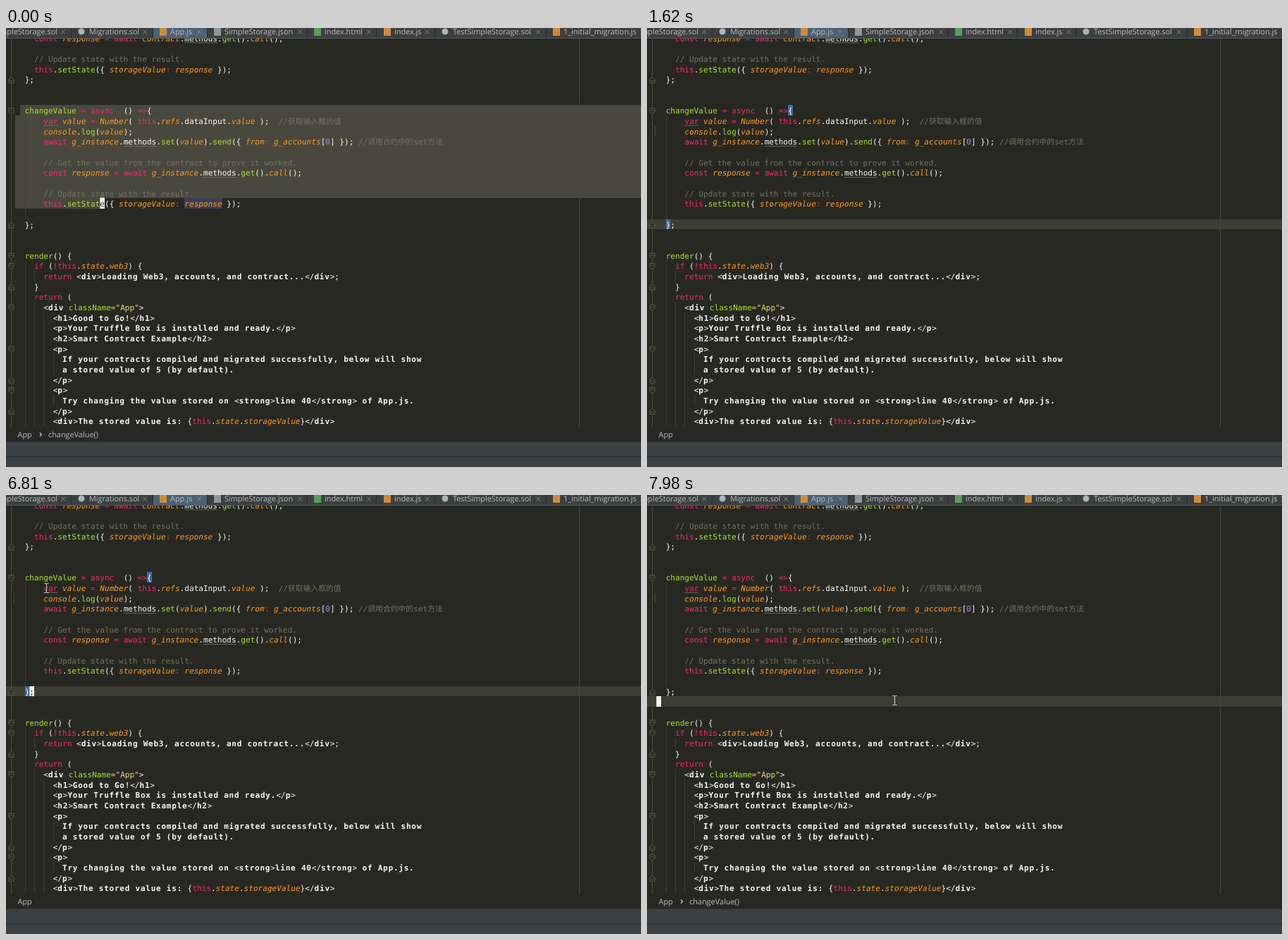
These frames come from a looping animation (901x622 px, 8 s). An HTML page:

```html
<!DOCTYPE html>
<html lang="en">
<head>
<meta charset="utf-8">
<title>Code editor</title>
<style>
html, body { margin: 0; width: 100%; height: 100%; overflow: hidden; background: #272822; }
svg { display: block; width: 901px; height: 622px; }
text { white-space: pre; text-rendering: geometricPrecision; }
.code { font: 11.074px "DejaVu Sans Mono", monospace; fill: #f8f8f2; }
.ui { font: 10.9px "Open Sans", sans-serif; fill: #bbb; }
.p { fill: #f92672; }
.g { fill: #a6e22e; }
.o { fill: #fd971f; font-style: italic; }
.y { fill: #e6db74; }
.u { fill: #ae81ff; }
.c { fill: #75715e; }
.b { font-weight: bold; letter-spacing: .733px; }
.z { fill: #75715e; font: 10.8px "Noto Sans CJK SC", "Noto Sans CJK JP", "Noto Sans CJK", sans-serif; }
</style>
</head>
<body>
<svg viewBox="0 0 901 622">
  <rect width="901" height="622" fill="#272822"/>
  <g id="under" shape-rendering="crispEdges"></g>
  <g id="guides" shape-rendering="crispEdges"></g>
  <g id="code" class="code"></g>
  <g id="caret" class="code"></g>
  <g id="frame" class="ui"></g>
  <path id="mouse" d="M-3-6.5h2q1 0 1 1q0-1 1-1h2M0-5.5v11M-3 6.5h2q1 0 1-1q0 1 1 1h2" fill="none" stroke="#d8d8d4"/>
</svg>
<script>
const $ = id => document.getElementById(id);
const CW = 20 / 3, BOLD = 7.4, LH = 44 / 3, LEFT = 40 / 3, W = 901;
const col = c => LEFT + CW * c;
const rowY = l => Math.round(109.33 + LH * l);
const base = l => 121.3 + LH * l;
const esc = s => s.replace(/&/g, "&amp;").replace(/</g, "&lt;");
const rect = (x, y, w, h, fill) => `<rect x="${x}" y="${y}" width="${w}" height="${h}" fill="${fill}"/>`;

// [line, column, markup]; each "~" is followed by a style letter
const SET_STATE = "~pthis~w.~gsetState~w({ ~ostorageValue~p: ~oresponse~w });";
const CALL = "~w.~mmethods~w.~gget~w().~ocall~w();";
const tag = (name, body) => `~w<~b${name}~w>~b${body}~w</~b${name}~w>`;
const LINES = [
  [-7, 4, "~pconst ~oresponse ~p= await ~ocontract" + CALL],
  [-5, 4, "~c// Update state with the result."],
  [-4, 4, SET_STATE],
  [-3, 2, "~w};"],
  [0, 2, "~gchangeValue ~p= async  ~w() ~p=>~w{"],
  [1, 6, "~vvar ~ovalue ~p= ~oNumber~w( ~pthis~w.~orefs~w.dataInput.~ovalue~w );  ~c//~z获取输入框的值"],
  [2, 6, "~oconsole~w.~glog~w(~ovalue~w);"],
  [3, 6, "~pawait ~og_instance~w.~mmethods~w.~gset~w(~ovalue~w).~gsend~w({ ~ofrom~p: ~og_accounts~w[~u0~w] }); ~c//~z调用合约中的~cset~z方法"],
  [5, 6, "~c// Get the value from the contract to prove it worked."],
  [6, 6, "~pconst ~oresponse ~p= await ~og_instance" + CALL],
  [8, 6, "~c// Update state with the result."],
  [9, 6, SET_STATE],
  [11, 2, "~w};"],
  [14, 2, "~grender~w() {"],
  [15, 4, "~pif ~w(~p!this~w.~ostate~w.~oweb3~w) {"],
  [16, 6, "~preturn " + tag("div", "Loading Web3, accounts, and contract...") + "~w;"],
  [17, 4, "~w}"],
  [18, 4, "~preturn ~w("],
  [19, 6, "~w<~bdiv~w ~gclassName~y=\"App\"~w>"],
  [20, 8, tag("h1", "Good to Go!")],
  [21, 8, tag("p", "Your Truffle Box is installed and ready.")],
  [22, 8, tag("h2", "Smart Contract Example")],
  [23, 8, "~w<~bp~w>"],
  [24, 10, "~bIf your contracts compiled and migrated successfully, below will show"],
  [25, 10, "~ba stored value of 5 (by default)."],
  [26, 8, "~w</~bp~w>"],
  [27, 8, "~w<~bp~w>"],
  [28, 10, "~bTry changing the value stored on " + tag("strong", "line 40") + "~b of App.js."],
  [29, 8, "~w</~bp~w>"],
  [30, 8, "~w<~bdiv~w>~bThe stored value is: ~w{~pthis~w.~ostate~w.~ostorageValue~w}</~bdiv~w>"]
];

function drawLine([line, c, markup]) {
  let x = col(c), out = "";
  const y = base(line);
  for (const part of markup.split("~").slice(1)) {
    const s = part.slice(1);
    let k = part[0];
    const adv = k === "b" ? BOLD : k === "z" ? 10.8 : CW;
    if (k === "m" || k === "v") {
      out += `<path d="M${x} ${y + 2.2}h${s.trim().length * CW}" stroke="#77776c" stroke-width=".8"/>`;
      k = k === "v" ? "p" : "w";
    }
    out += `<text class="${k}" x="${x}" y="${y}">${esc(s)}</text>`;
    x += adv * s.length;
  }
  return out;
}
$("code").innerHTML = LINES.map(drawLine).join("");

// indent guides [column, first line, last line], gutter and margin lines
const GUIDES = [[2, 1, 10], [2, 15, 30], [4, 16, 16], [4, 19, 30], [6, 20, 30], [8, 24, 25], [8, 28, 28]];
const OPENS = [0, 14, 15, 19, 23, 27], CLOSES = [-3, 11, 17, 26, 29];
const fold = (l, dir) =>
  `<path transform="translate(7.5 ${base(l) - 3.5}) scale(1 ${dir})" d="M-3.5-4h7v5l-3.5 3l-3.5-3zM-2-1h4" fill="#272822" stroke="#5d5d55" shape-rendering="auto"/>`;
$("guides").innerHTML =
  GUIDES.map(([c, a, b]) => rect(Math.round(col(c)), rowY(a), 1, rowY(b + 1) - rowY(a), "#3c3d36")).join("") +
  rect(7, 15, 1, 551, "#4b4b44") + rect(813, 15, 1, 551, "#45463f") +
  OPENS.map(l => fold(l, 1)).join("") + CLOSES.map(l => fold(l, -1)).join("");

// tabs: [label x, label, icon colour, close x, right edge]
const SOL = "#aab4bc", JS = "#cf8b3c";
const TABS = [
  [-18, "SimpleStorage.sol", SOL, 81, 93],
  [118, "Migrations.sol", SOL, 197, 209],
  [233, "App.js", JS, 274, 286],
  [310, "SimpleStorage.json", "#8f979d", 417, 428],
  [452, "index.html", "#55a05a", 515, 526],
  [551, "index.js", JS, 598, 609],
  [634, "TestSimpleStorage.sol", SOL, 755, 767],
  [791, "1_initial_migration.js", JS, 903, 915]
];
const drawTab = ([x, label, color, close, edge], i) => {
  const icon = color === SOL ? `<circle cx="${x - 11}" cy="5" r="4.5" fill="${color}"/>` : rect(x - 15, 0, 10, 11, color);
  const text = i ? `<text x="${x}" y="8.5">${label}</text>` : `<text x="73" y="8.5" text-anchor="end">${label}</text>`;
  return icon + text + rect(edge - 1, 0, 1, 14, "#292b2c") +
    `<path d="M${close - 3} 2.5l6 6m0-6l-6 6" stroke="#85898c"/>`;
};
$("frame").innerHTML =
  rect(0, 0, W, 14, "#3c3f41") + rect(209, 0, 77, 14, "#4c6273") +
  rect(0, 14, W, 1, "#55595b") + TABS.map(drawTab).join("") +
  rect(0, 566, W, 20, "#272822") + rect(0, 586, W, 36, "#3b4045") +
  rect(0, 586, W, 1, "#33363a") + rect(0, 607, W, 1, "#282a2d") +
  `<text x="16.5" y="580">App</text>` +
  `<g id="crumb"><path d="M48 573.5l2.5 2.5l-2.5 2.5" fill="none" stroke="#ccc" stroke-width="1.2"/><text x="60" y="580">changeValue()</text></g>`;

// timeline: each row changes part of the state
// sel: [line, column, line, column]; caret: [line, column, covered letter]
const TIMELINE = [
  [0, { sel: [0, 1, 9, 18], caret: [9, 18, "e"], mouse: [136, 247], word: 1, crumb: 1, on: 1 }],
  [150, { sel: [0, 1, 9, 22], caret: [9, 22, "s"], mouse: [152, 251], word: 0, band: 1 }],
  [270, { sel: [0, 1, 10, 0], caret: [10, 0], mouse: [170, 262] }],
  [420, { sel: [0, 1, 11, 4], caret: [11, 4], mouse: [178, 271] }],
  [540, { mouse: [180, 272] }],
  [660, { sel: 0 }],
  [810, { caret: [11, 3, ";"], braces: 1 }],
  [930, { crumb: 0 }],
  [1080, { mouse: [394, 418] }],
  [1220, { mouse: 0 }],
  [1620, { on: 0 }], [2210, { on: 1 }],
  [2610, { on: 0 }], [3130, { on: 1 }],
  [3690, { on: 0 }], [4120, { on: 1 }],
  [4670, { on: 0 }], [5110, { on: 1 }],
  [5510, { on: 0, mouse: [301, 586] }],
  [5630, { mouse: [278, 494] }],
  [5780, { mouse: [270, 420] }],
  [5900, { mouse: [256, 345] }],
  [6020, { mouse: [239, 285], on: 1 }],
  [6270, { mouse: [168, 224] }],
  [6390, { mouse: [113, 178] }],
  [6540, { mouse: [88, 156] }],
  [6660, { mouse: [69, 139] }],
  [6810, { mouse: [57, 132] }],
  [6930, { caret: [1, 6, "v"], braces: 0 }],
  [7080, { sel: [1, 6, 3, 23], caret: [3, 23, "m"], mouse: [168, 162] }],
  [7200, { sel: [1, 6, 6, 37], caret: [6, 37, "c"], mouse: [260, 206] }],
  [7320, { sel: [1, 6, 8, 38], caret: [8, 38], mouse: [315, 235] }],
  [7470, { sel: [1, 6, 9, 48], caret: [9, 48], mouse: [335, 251] }],
  [7590, { sel: [1, 6, 10, 0], caret: [10, 0], mouse: [344, 265], crumb: 1 }],
  [7710, { sel: [1, 6, 11, 4], caret: [11, 4], mouse: [349, 279] }],
  [7830, { sel: [1, 6, 12, 0], caret: [12, 0], mouse: [351, 291] }],
  [7980, { sel: 0 }]
];
let last = { band: 0, braces: 0 };
const STATES = TIMELINE.map(([t, change]) => [t, last = { ...last, ...change }]);

const span = (l, x1, x2, color) => rect(x1, rowY(l), x2 - x1, rowY(l + 1) - rowY(l), color);

function show(s) {
  const [line, c, letter] = s.caret;
  let under = s.band ? span(line, 0, W, "#3e3d32") : "";
  if (s.sel) {
    const [l1, c1, l2, c2] = s.sel;
    for (let l = l1; l <= l2; l++)
      under += span(l, l === l1 ? col(c1) : LEFT, l === l2 ? col(c2) : W, "#49483e");
  }
  if (s.word) under += span(9, col(36), col(44), "#3c3c57");
  if (s.braces) under += span(0, col(28), col(29), "#3a6ea8") + span(11, col(2), col(3), "#3a6ea8");
  // change mark beside the fold column
  if (!s.sel) under += rect(11, 139, 1, 14, "#45463f");
  $("under").innerHTML = under;
  $("caret").innerHTML = s.on ? span(line, col(c), col(c + 1), "#f8f8f2") +
    (letter ? `<text x="${col(c)}" y="${base(line)}" style="fill:#272822">${letter}</text>` : "") : "";
  $("crumb").setAttribute("visibility", s.crumb ? "visible" : "hidden");
  const m = $("mouse");
  m.setAttribute("visibility", s.mouse ? "visible" : "hidden");
  if (s.mouse) m.setAttribute("transform", `translate(${s.mouse[0] + .5} ${s.mouse[1]})`);
}

const start = performance.now();
let shown;
function tick() {
  const t = (performance.now() - start) % 8000;
  let now = STATES[0][1];
  for (const [at, s] of STATES) if (at <= t) now = s;
  if (now !== shown) show(shown = now);
  requestAnimationFrame(tick);
}
tick();
</script>
</body>
</html>
```
